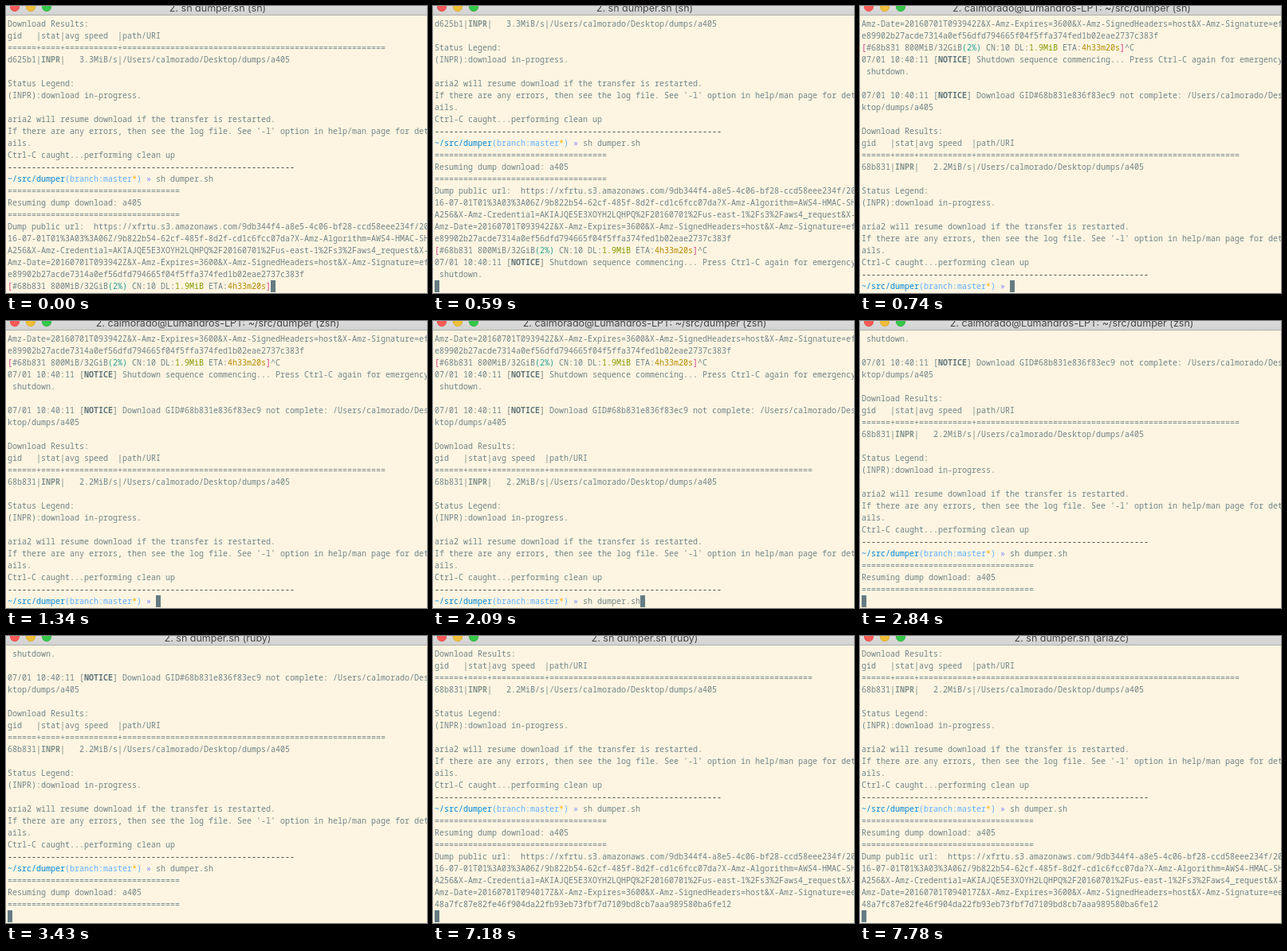
An HTML page with a canvas for the animation above (8 s loop, 528 px wide and 361 px high).

```html
<!DOCTYPE html>
<html lang="en">
<head>
<meta charset="utf-8">
<title>Terminal</title>
<style>
  html, body { margin: 0; width: 100%; height: 100%; overflow: hidden; background: #fdf5e1; }
  canvas { display: block; }
</style>
</head>
<body>
<canvas id="stage" width="528" height="361"></canvas>
<script>
const ctx = document.getElementById('stage').getContext('2d');
const LOOP = 8000, ROWS = 23, LEFT = 2, TOP = 15, CELL = 6, LINE = 15;
const PAPER = '#fdf5e1', INK = '#708489', CURSOR = '#657b83';

// Inline markup {k:text} picks one of these colours; b and s are bold.
const COLORS = {
  p: '#0087d7', g: '#5fafff', o: '#ffaf00', a: '#8787ff', d: '#3a3a3a',
  m: '#d33682', c: '#2aa198', n: '#859900', y: '#b58900', b: '#5f747b', s: '#82938f'
};

const USER = 'calmorado';
const rule = '='.repeat(36);

const results = (gid, speed) => [
  'Download Results:',
  'gid   |stat|avg speed  |path/URI',
  '======+====+===========+' + '='.repeat(55),
  `${gid}|{s:INPR}|   ${speed}|/Users/${USER}/Desktop/dumps/a405`,
  '',
  'Status Legend:',
  '(INPR):download in-progress.',
  '',
  'aria2 will resume download if the transfer is restarted.',
  "If there are any errors, then see the log file. See '-l' option in help/man page for det",
  'ails.',
  'Ctrl-C caught...performing clean up'
];

const command = (stamp, sigStart, sigEnd) => [
  `{d:${'-'.repeat(60)}}`,
  '{p:~/src/dumper}{g:(branch:master}{o:*}{g:)} {a:»} sh dumper.sh',
  rule,
  'Resuming dump download: a405',
  rule,
  'Dump public url:  https://xfrtu.s3.amazonaws.com/9db344f4-a8e5-4c06-bf28-ccd58eee234f/20',
  '16-07-01T01%3A03%3A06Z/9b822b54-62cf-485f-8d2f-cd1c6fcc07da?X-Amz-Algorithm=AWS4-HMAC-SH',
  'A256&X-Amz-Credential=AKIAJQE5E3XOYH2LQHPQ%2F20160701%2Fus-east-1%2Fs3%2Faws4_request&X-',
  `Amz-Date=20160701T${stamp}Z&X-Amz-Expires=3600&X-Amz-SignedHeaders=host&X-Amz-Signature=${sigStart}`,
  sigEnd
];

const log = [
  ...results('d625b1', '3.3MiB/s'),
  ...command('093942', 'ef', 'e89902b27acde7314a0ef56dfd794665f04f5ffa374fed1b02eae2737c383f'),
  '{m:[}#68b831 800MiB/32GiB{c:(2%)} CN:10 DL:{n:1.9MiB} ETA:{y:4h33m20s}{m:]}^C',
  '07/01 10:40:11 [{b:NOTICE}] Shutdown sequence commencing... Press Ctrl-C again for emergency',
  ' shutdown.',
  '',
  `07/01 10:40:11 [{b:NOTICE}] Download GID#68b831e836f83ec9 not complete: /Users/${USER}/Des`,
  'ktop/dumps/a405',
  '',
  ...results('68b831', '2.2MiB/s'),
  ...command('094017', 'ee', '48a7fc87e82fe46f904da22fb93eb73fbf7d7109bd8cb7aaa989580ba6fe12'),
  ''
];

// Bottom row of the view and cursor column; that row is cut off at the cursor.
const screens = [
  { at: 0, row: 22, col: 55 },
  { at: 590, row: 25, col: 0 },
  { at: 740, row: 42, col: 31 },
  { at: 2090, row: 42, col: 43 },
  { at: 2840, row: 46, col: 0 },
  { at: 7180, row: 51, col: 0 }
];

const shellTitle = name => `2. ${USER}@Lumandros-LPT: ~/src/dumper (${name})`;
const jobTitle = name => `2. sh dumper.sh (${name})`;
const titles = [
  { at: 0, text: jobTitle('sh') },
  { at: 740, text: shellTitle('sh') },
  { at: 1340, text: shellTitle('zsh') },
  { at: 2990, text: jobTitle('sh') },
  { at: 3430, text: jobTitle('ruby') },
  { at: 7780, text: jobTitle('aria2c') }
];

const current = (list, time) => list.filter(item => item.at <= time).pop();

function drawLine(line, row, limit) {
  let col = 0;
  for (const [, key, marked, plain] of line.matchAll(/\{(\w):(.*?)\}|([^{]+)/g)) {
    const text = (marked || plain).slice(0, Math.max(0, limit - col));
    const weight = key === 'b' || key === 's' ? 700 : 300;
    ctx.font = `${weight} 10px "Noto Sans Mono", "Liberation Mono", monospace`;
    ctx.fillStyle = COLORS[key] || INK;
    ctx.fillText(text, LEFT + col * CELL, TOP + row * LINE + 11);
    col += text.length;
  }
}

function drawTitleBar(text) {
  const shade = ctx.createLinearGradient(0, 0, 0, 11);
  shade.addColorStop(0, '#dcdcdc');
  shade.addColorStop(1, '#d2d2d2');
  ctx.fillStyle = shade;
  ctx.fillRect(0, 0, 528, 11);
  ctx.fillStyle = '#b4b2ae';
  ctx.fillRect(0, 11, 528, 1);

  [['#fc5b57', '#df4744'], ['#f0be38', '#d6a52c'], ['#34c84a', '#27aa35']].forEach(([fill, edge], i) => {
    ctx.beginPath();
    ctx.arc(11 + i * 20, 1, 5.7, 0, Math.PI * 2);
    ctx.fillStyle = fill;
    ctx.fill();
    ctx.strokeStyle = edge;
    ctx.lineWidth = 0.7;
    ctx.stroke();
  });

  ctx.font = '12.5px Inter, Roboto, sans-serif';
  ctx.fillStyle = '#484848';
  ctx.textAlign = 'center';
  ctx.fillText(text, 265.5, 7);
  ctx.textAlign = 'left';
}

function draw(now) {
  const time = now % LOOP;
  const { row: last, col } = current(screens, time);
  ctx.fillStyle = PAPER;
  ctx.fillRect(0, 0, 528, 361);
  for (let i = 0; i < ROWS; i++) {
    const index = last - ROWS + 1 + i;
    drawLine(log[index], i, index === last ? col : Infinity);
  }
  ctx.fillStyle = CURSOR;
  ctx.fillRect(LEFT + col * CELL, TOP + (ROWS - 1) * LINE, CELL, LINE);
  drawTitleBar(current(titles, time).text);
}

const start = performance.now();
function tick() {
  draw(performance.now() - start);
  requestAnimationFrame(tick);
}
tick();
</script>
</body>
</html>
```
